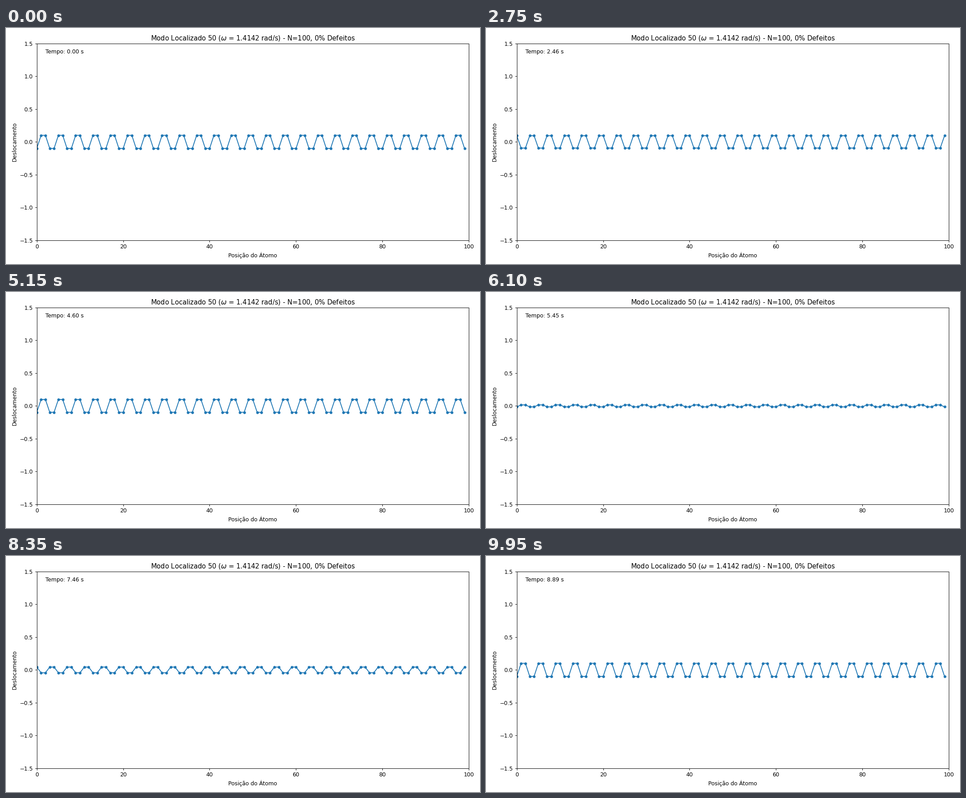
A matplotlib script that plays this animation: 1058 by 529 pixels, repeating every 10 s.

```python
import numpy as np
import matplotlib.pyplot as plt
from matplotlib.animation import FuncAnimation

N = 100                # atoms in the chain
MODE = 50
FRAMES = 200
INTERVAL = 50          # ms
DPI = 1058 / 12        # 12 x 6 in -> 1058 x 529 px
LAYOUT_DPI = 100       # margins are measured at this resolution

plt.rcParams["font.family"] = "DejaVu Sans"

# Free chain with unit masses and springs
omega = 2 * np.sin(np.pi * MODE / (2 * N))
atoms = np.arange(N)
shape = -np.sqrt(2 / N) * np.cos(np.pi * MODE * (atoms + 0.5) / N)
times = np.linspace(0, 4 * np.pi / omega, FRAMES)

fig, ax = plt.subplots(figsize=(12, 6), dpi=DPI)
line, = ax.plot(atoms, shape, "o-", color="#1f77b4", lw=1.5, markersize=4)
clock = ax.text(0.02, 0.95, "", transform=ax.transAxes)

ax.set_xlim(0, N)
ax.set_ylim(-1.5, 1.5)
ax.set_xlabel("Posição do Átomo")
ax.set_ylabel("Deslocamento")
ax.set_title(rf"Modo Localizado {MODE} ($\omega$ = {omega:.4f} rad/s)"
             f" - N={N}, 0% Defeitos")

fig.set_dpi(LAYOUT_DPI)
fig.tight_layout()
fig.set_dpi(DPI)


def update(i):
    t = times[i]
    line.set_ydata(shape * np.cos(omega * t))
    clock.set_text(f"Tempo: {t:.2f} s")
    return line, clock


anim = FuncAnimation(fig, update, frames=FRAMES, interval=INTERVAL,
                     repeat=True, repeat_delay=0, blit=False)
plt.show()
```
